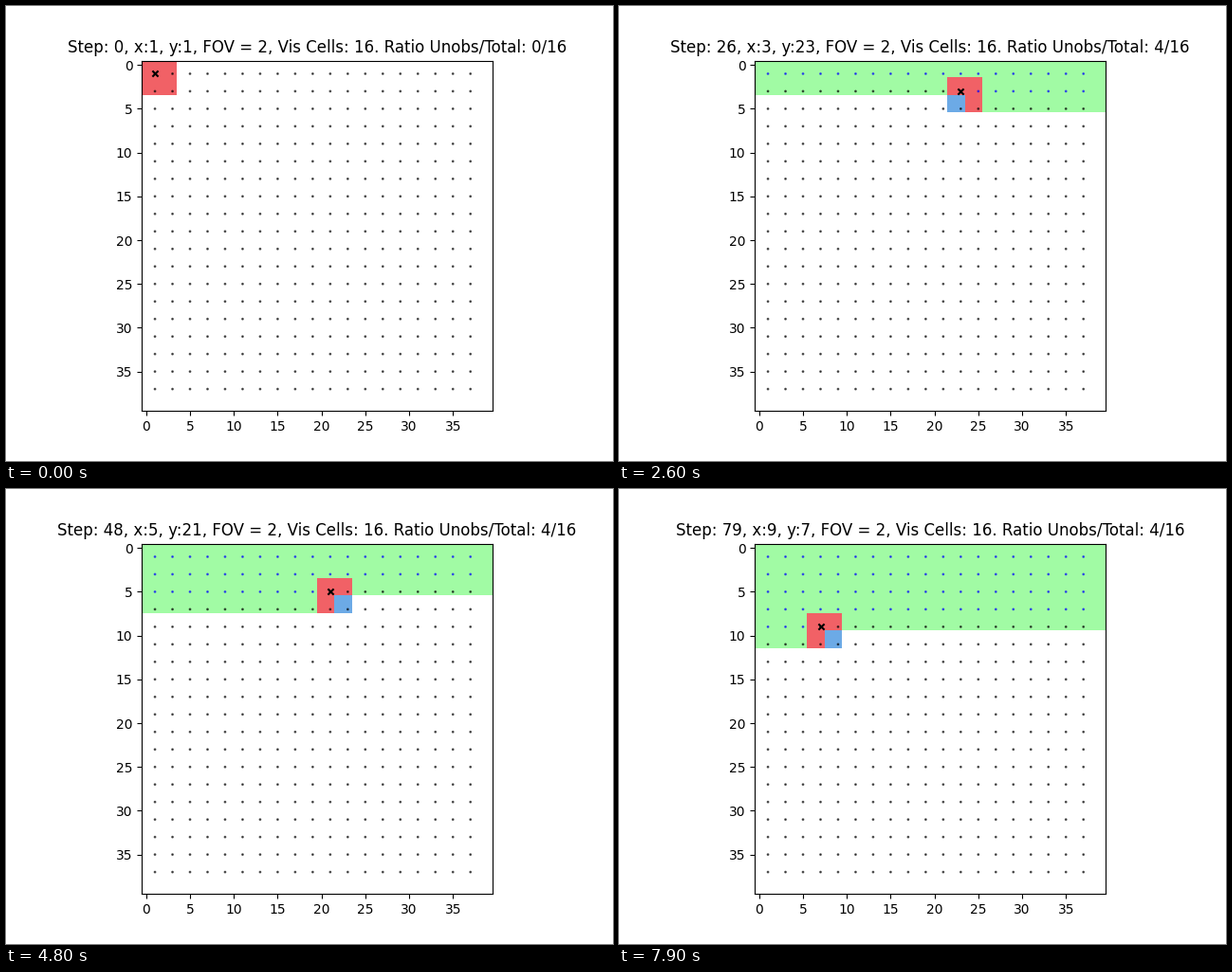
Animation, 640 px wide and 480 px high, one loop 8000 ms. Source, as a matplotlib script:

```python
import numpy as np
import matplotlib.pyplot as plt
from matplotlib.animation import FuncAnimation

SIZE, FOV, STEPS = 40, 2, 80
LANE = np.arange(1, SIZE - 1, 2)
N = len(LANE)

WHITE, GREEN = (255, 255, 255), (161, 251, 164)
RED, BLUE = (241, 97, 102), (108, 170, 230)


def cell(step):
    """Row and column on a back-and-forth sweep of the grid."""
    lane, i = divmod(step, N)
    return LANE[lane], LANE[i if lane % 2 == 0 else N - 1 - i]


def window(step):
    r, c = cell(step)
    return (slice(r - FOV + 1, r + FOV + 1), slice(c - FOV + 1, c + FOV + 1))


def observed_before(step):
    seen = np.zeros((SIZE, SIZE), bool)
    for k in range(max(step, 1)):
        seen[window(k)] = True
    return seen


fig, ax = plt.subplots(figsize=(6.4, 4.8), dpi=100)
image = ax.imshow(np.full((SIZE, SIZE, 3), 255, np.uint8), interpolation="nearest")
cols, rows = np.meshgrid(LANE, LANE)
dots = ax.scatter(cols.ravel(), rows.ravel(), s=1, color="black")
agent = ax.scatter([1], [1], s=20, marker="x", color="black")
title = ax.set_title("")
ax.set_xlim(-0.5, SIZE - 0.5)
ax.set_ylim(SIZE - 0.5, -0.5)
ax.set_xticks(range(0, SIZE, 5))
ax.set_yticks(range(0, SIZE, 5))


def update(step):
    r, c = cell(step)
    view = window(step)
    seen = observed_before(step)
    fresh = ~seen[view]

    grid = np.where(seen[..., None], GREEN, WHITE).astype(np.uint8)
    grid[view] = np.where(fresh[..., None], BLUE, RED)
    image.set_data(grid)

    shade = np.tile((0, 0, 0, 0.6), (N * N, 1))
    for k in range(step):
        pr, pc = cell(k)
        shade[pr // 2 * N + pc // 2] = (0, 0, 1, 0.6)
    dots.set_color(shade)

    agent.set_offsets([(c, r)])
    title.set_text(f"Step: {step}, x:{r}, y:{c}, FOV = {FOV}, "
                   f"Vis Cells: {fresh.size}. "
                   f"Ratio Unobs/Total: {fresh.sum()}/{fresh.size}")
    return image, dots, agent, title


anim = FuncAnimation(fig, update, frames=STEPS, interval=100,
                     repeat=True, repeat_delay=0, blit=False)
plt.show()
```
